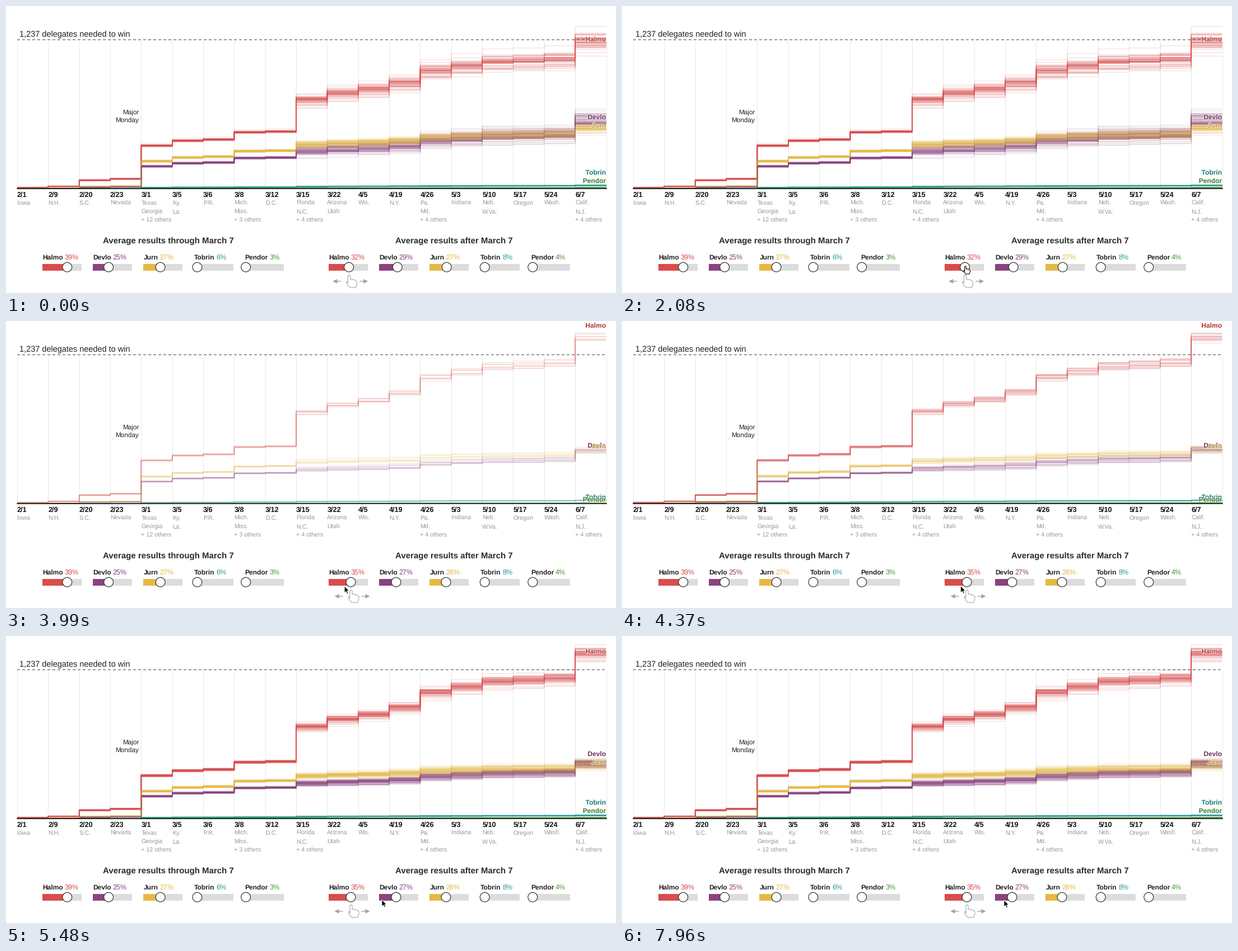
Animation, 1089 px wide and 514 px high, one loop 8000 ms. Source, as a matplotlib script:

```python
import numpy as np
import matplotlib.pyplot as plt
from matplotlib.animation import FuncAnimation
from matplotlib.collections import LineCollection
from matplotlib.colors import to_rgb
from matplotlib.patches import Circle, Polygon, Rectangle
from matplotlib.patheffects import withStroke

W, H, DPI = 1089, 514, 64
PT = 72 / DPI  # points per pixel
STEP, LOOP = 50, 8000
RUNS, BATCHES = 60, 15
BASE = 327  # y of the zero line

plt.rcParams["text.hinting"] = "none"

CANDIDATES = [("Halmo", "#d94c4c"), ("Devlo", "#8a437f"), ("Jurn", "#e5b944"),
              ("Tobrin", "#2a9d9a"), ("Pendor", "#4f9a3f")]

# date, places, height of the delegates at stake in pixels
CONTESTS = [
    ("2/1", "Iowa", 2.5), ("2/9", "N.H.", 2.5), ("2/20", "S.C.", 13.7),
    ("2/23", "Nevada", 3), ("3/1", "Texas|Georgia|+ 12 others", 142),
    ("3/5", "Ky.|La.", 21), ("3/6", "P.R.", 5),
    ("3/8", "Mich.|Miss.|+ 3 others", 31), ("3/12", "D.C.", 3),
    ("3/15", "Florida|N.C.|+ 4 others", 83), ("3/22", "Arizona|Utah", 18),
    ("4/5", "Wis.", 11), ("4/19", "N.Y.", 17),
    ("4/26", "Pa.|Md.|+ 4 others", 36), ("5/3", "Indiana", 13),
    ("5/10", "Neb.|W.Va.", 13), ("5/17", "Oregon", 3), ("5/24", "Wash.", 5),
    ("6/7", "Calif.|N.J.|+ 4 others", 59),
]
STAKES = np.array([c[2] for c in CONTESTS])
EDGES = np.linspace(20, 1071.5, len(CONTESTS) + 1)
OPENING, SPRING = 4, 5
LATE = len(CONTESTS) - OPENING - SPRING

fig = plt.figure(figsize=(W / DPI, H / DPI), dpi=DPI, facecolor="white")
ax = fig.add_axes([0, 0, 1, 1])
ax.set(xlim=(0, W), ylim=(H, 0))
ax.axis("off")


def style(size, color="#222222", bold=False):
    return dict(fontsize=size * PT, color=color, va="baseline",
                family="Liberation Sans",
                weight="bold" if bold else "normal")


def label(x, y, s, *look, **kw):
    return ax.text(x, y, s, **style(*look), **kw)


# ---- chart frame ----
ax.vlines(EDGES, 62, BASE, colors="#e8e8e8", lw=PT, zorder=1)
ax.plot([20, 1071.5], [60.5, 60.5], color="#444444", lw=PT,
        ls=(0, (5, 4)), snap=False, zorder=4)
ax.plot([20, 1071.5], [BASE, BASE], color="#111111", lw=1.6 * PT, zorder=4)
label(24, 55, "1,237 delegates needed to win", 14.5)
label(237, 194.5, "Major", 11.8, ha="right")
label(237, 209, "Monday", 11.8, ha="right")
for x, (date, places, _) in zip(EDGES, CONTESTS):
    label(x, 342, date, 12.6, "#111111", True)
    for row, place in enumerate(places.split("|")):
        label(x, 356 + 15.4 * row, place, 10.8, "#999999")


# ---- simulated delegate counts ----
EARLY = [(0.8, 0.42), (0.14, 0.26), (0.2, 0.315), (0.012, 0.012),
         (0.003, 0.003)]
MINOR = [(0.012, 0.012, 0), (0.003, 0.003, 0)]


def simulate(seed, outlook):
    """Step lines of every run, candidates interleaved, and mean end heights.

    The outlook gives each candidate's late share at first and at last,
    and how uncertain it is.
    """
    rng = np.random.default_rng(seed)
    ys = []
    for (opening, spring), (first, last, doubt) in zip(EARLY, outlook):
        share = np.r_[np.full(OPENING, opening), np.full(SPRING, spring),
                      np.linspace(first, last, LATE)]
        z = rng.standard_normal((RUNS, len(STAKES)))
        z = (z - z.mean(axis=0)) / z.std(axis=0)
        luck = doubt * np.sqrt(STAKES) * z
        luck[:, :-LATE] = 0
        rise = np.cumsum(STAKES * share)
        jitter = 1.3 * np.tanh(np.sqrt(rise) / 8) * z[:, :1]
        ys.append(BASE - rise - np.cumsum(luck, axis=1) + jitter)
    y = np.repeat(np.stack(ys, axis=1), 2, axis=2)
    x = np.broadcast_to(np.repeat(EDGES, 2)[1:-1], y.shape)
    lines = np.stack([x, y], axis=-1).reshape(-1, y.shape[-1], 2)
    return lines, y[:, :, -1].mean(axis=0)


def draw_runs(lines):
    runs = LineCollection(lines, colors=[c[1] for c in CANDIDATES] * RUNS,
                          linewidths=1.4 * PT, alpha=0.16, zorder=3)
    runs.set_snap(False)
    return ax.add_collection(runs, autolim=False)


def spread_out(ends, gap=15):
    """Label baselines from the bottom up, at least one gap apart."""
    rows, limit = [], BASE - 10
    for y in ends[::-1]:
        rows.append(min(y, limit))
        limit = rows[-1] - gap
    return rows[::-1]


lines_before, ends_before = simulate(
    4, [(0.68, 0.55, 0.55), (0.14, 0.42, 0.5), (0.13, 0.2, 0.35)] + MINOR)
lines_after, ends_after = simulate(
    11, [(0.75, 0.75, 0.36), (0.09, 0.27, 0.26), (0.1, 0.13, 0.24)] + MINOR)
before = draw_runs(lines_before)
after = draw_runs(lines_after)

rows_before = spread_out(ends_before)
rows_after = spread_out(ends_after)
rows_running = np.r_[12, ends_after[1:] - 2]  # leader is kept above the lines

halo = [withStroke(linewidth=2 * PT, foreground="white", alpha=0.7)]
end_labels = [label(1071, 0, name, 12, 0.83 * np.array(to_rgb(color)), True,
                    ha="right", zorder=5, path_effects=halo)
              for name, color in CANDIDATES]


# ---- sliders ----
class Slider:
    def __init__(self, x, name, color, value):
        self.x = x
        ax.add_patch(Rectangle((x, 462), 70, 11.5, fc="#dcdcdc", lw=0))
        self.fill = ax.add_patch(Rectangle((x, 462), 0, 11.5, fc=color, lw=0))
        self.knob = ax.add_patch(Circle((x, 467.7), 8.4, fc="white",
                                        ec="#333333", lw=1.2 * PT, zorder=5))
        title = label(x, 454, name, 12, "#222222", True)
        self.text = ax.annotate("", (1, 454), xycoords=(title, "data"),
                                xytext=(3 * PT, 0), textcoords="offset points",
                                **style(12.5, color))
        self.set(value)

    def set(self, value):
        pos = 1.165 * value - 1.2
        self.fill.set_width(pos)
        self.knob.center = (self.x + pos, 467.7)
        self.text.set_text(f"{value:.0f}%")
        return self.x + pos


def slider_row(x, title_x, title, values):
    label(title_x, 426, title, 15.05, "#2b2b2b", True)
    return [Slider(x + 90.2 * i, *c, v)
            for i, (c, v) in enumerate(zip(CANDIDATES, values))]


START = [32, 29, 27, 8, 4]
FINISH = [35, 27, 26, 8, 4]
slider_row(65, 173, "Average results through March 7", [39, 25, 27, 6, 3])
sliders = slider_row(576, 695, "Average results after March 7", START)

# ---- pointers ----
HAND = np.array([
    (-1.3, 9), (-1.3, 1), (0, 0), (1.3, 1), (1.3, 5), (2.6, 4.6), (4, 5.4),
    (5.4, 5.2), (8.5, 7.2), (8.5, 10), (7.2, 14), (0.6, 14), (-3, 9),
    (-2.6, 7.3),
])
ARROW = np.array([(0, 0), (0, 12), (2.8, 9.4), (4.6, 13.6), (6.6, 12.8),
                  (4.8, 8.7), (8.5, 8.7)])
SWIPE = np.array([(0, 0), (8, -4), (8, -0.7), (15, -0.7), (15, 0.7),
                  (8, 0.7), (8, 4)])


def shape(points, fc, ec, lw, zorder):
    return ax.add_patch(Polygon(points, fc=fc, ec=ec, lw=lw * PT,
                                joinstyle="round", zorder=zorder))


big_hand = shape(HAND, "white", "#a8a8a8", 1.1, 6)
swipe_left = shape(SWIPE, "#a3a3a3", "none", 0, 6)
swipe_right = shape(SWIPE, "#a3a3a3", "none", 0, 6)
hand = shape(HAND, "white", "black", 1.1, 8)
arrow = shape(ARROW, "black", "white", 0.8, 8)

# time, x, y where the pointer comes to rest or turns
PATH = np.array([
    (1080, 585, 508), (1850, 613, 466), (2080, 613, 466), (2350, 607, 470),
    (3320, 611, 473), (3590, 604, 475), (5000, 605, 474), (5660, 684, 472),
    (6280, 683, 474), (6990, 688, 476), (7960, 682, 473),
])


def pointer(t):
    k = np.interp(t, PATH[:, 0], np.arange(len(PATH)))
    i = min(int(k), len(PATH) - 2)
    u = k - i
    return PATH[i, 1:] + (PATH[i + 1, 1:] - PATH[i, 1:]) * u * u * (3 - 2 * u)


def update(i):
    t = i * STEP + 40

    drag = np.clip((t - 2520) / 800, 0, 1)
    knobs = [s.set(a + (b - a) * drag)
             for s, a, b in zip(sliders, START, FINISH)]
    knob = knobs[0]
    big_hand.set_xy(HAND * 1.62 + (knob + 0.5, 481.5))
    swipe_left.set_xy(SWIPE + (knob - 29, 493))
    swipe_right.set_xy(SWIPE * (-1, 1) + (knob + 34, 493))

    done = min(max((t - 3590) // 120 + 1, 0), BATCHES)
    before.set_visible(done == 0)
    runs = round(RUNS * (done / BATCHES) ** 1.5)
    after.set_segments(lines_after[:runs * len(CANDIDATES)])
    if done == 0:
        rows = rows_before
    elif done < BATCHES:
        rows = rows_running
    else:
        rows = rows_after
    for text, y in zip(end_labels, rows):
        text.set_y(y)

    tip = pointer(t)
    grabbing = 1780 <= t < 3590
    hand.set_xy(HAND + tip)
    arrow.set_xy(ARROW + tip)
    hand.set_visible(grabbing)
    arrow.set_visible(t >= 1080 and not grabbing)
    return []


anim = FuncAnimation(fig, update, frames=LOOP // STEP, interval=STEP,
                     repeat=True, repeat_delay=0, blit=False)
plt.show()
```
